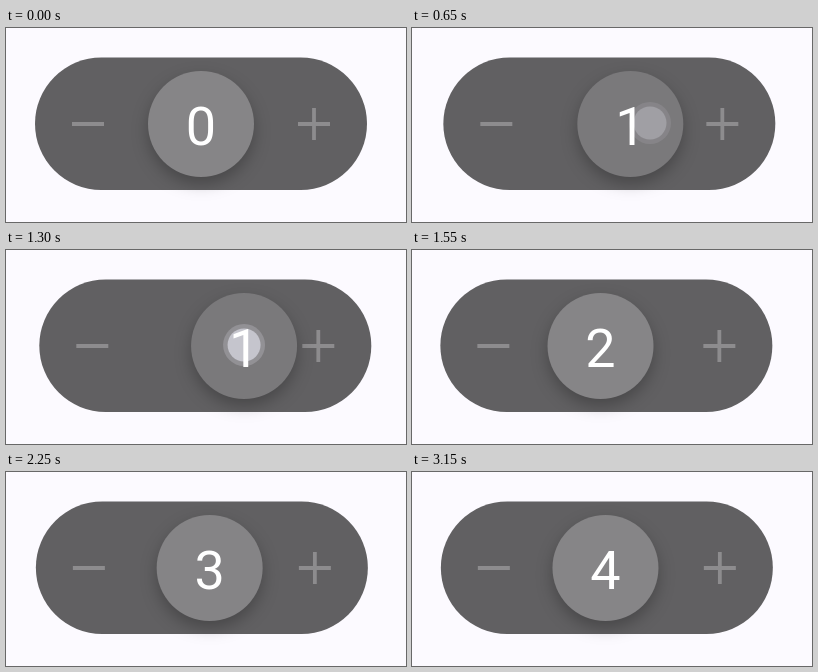
Write an HTML page that moves like this. It is 400 by 194 pixels and loops after 3200 ms.

```html
<!DOCTYPE html>
<html lang="en">
<head>
<meta charset="utf-8">
<title>Drag counter</title>
<style>
  html, body { margin: 0; width: 100%; height: 100%; overflow: hidden; background: #fcfaff; }
  svg { display: block; width: 100%; height: 100%; }
  #knob { filter: drop-shadow(0 7px 8px rgba(0, 0, 0, .26)); }
  #value { font: 400 54px Roboto, sans-serif; text-anchor: middle; fill: #fff; }
</style>
</head>
<body>
<svg viewBox="0 0 400 194">
  <g id="pill">
    <rect x="29" y="29.5" width="332" height="132.5" rx="66.25" fill="#616062"/>
    <path d="M66 96H98M292 96H324M308 80V112" stroke="#8d8c8e" stroke-width="3.8"/>
  </g>
  <g id="knob">
    <circle id="disc" cx="195" cy="96" r="53"/>
  </g>
  <g id="touch" fill="#e6e5f0">
    <circle cy="95" r="21" opacity=".22"/>
    <circle cy="95" r="16.5" opacity=".62"/>
  </g>
  <text id="value" x="195" y="117">0</text>
</svg>
<script>
  const LOOP = 3200, STEP = 50, CENTER = 195;
  const drags = [
    { start: 390, release: 575, reach: 43 },
    { start: 1090, release: 1330, reach: 45 },
    { start: 1740, release: 2040, reach: -62 },
    { start: 2410, release: 2690, reach: -74 }
  ];
  const [pill, knob, disc, touch, value] =
    ['pill', 'knob', 'disc', 'touch', 'value'].map(id => document.getElementById(id));

  const clamp = x => Math.min(1, Math.max(0, x));
  const smooth = x => x * x * (3 - 2 * x);
  const shift = (el, x) => el.setAttribute('transform', `translate(${x} 0)`);

  // Underdamped spring released from rest at 1.
  function spring(ms) {
    const decay = 0.0086, freq = Math.PI / 225;
    return Math.exp(-decay * ms) *
      (Math.cos(freq * ms) + decay / freq * Math.sin(freq * ms));
  }

  function draw(t) {
    const drag = drags.filter(d => t >= d.start).pop();
    let offset = 0, finger = 0, glow = 0, dim = 0;
    if (drag) {
      const { start, release, reach } = drag;
      const pull = smooth(clamp((t - start) / (release - start)));
      const after = t - release;
      finger = reach * pull;
      offset = after < 0 ? finger : reach * spring(after);
      const press = clamp((t - start) / 80);
      glow = press * clamp(1 - after / 150);
      dim = press * clamp(1 - (after - 75) / 150);
    }
    shift(pill, offset * 0.1);
    shift(knob, offset);
    shift(value, offset);
    shift(touch, CENTER + finger);
    touch.setAttribute('opacity', glow);
    const gray = 134 - 12 * dim;
    disc.setAttribute('fill', `rgb(${gray} ${gray - 1} ${gray + 1})`);
    value.textContent = drags.filter(d => t >= d.release).length;
  }

  function tick() {
    draw(Math.floor(performance.now() % LOOP / STEP) * STEP);
    requestAnimationFrame(tick);
  }
  tick();
</script>
</body>
</html>
```
